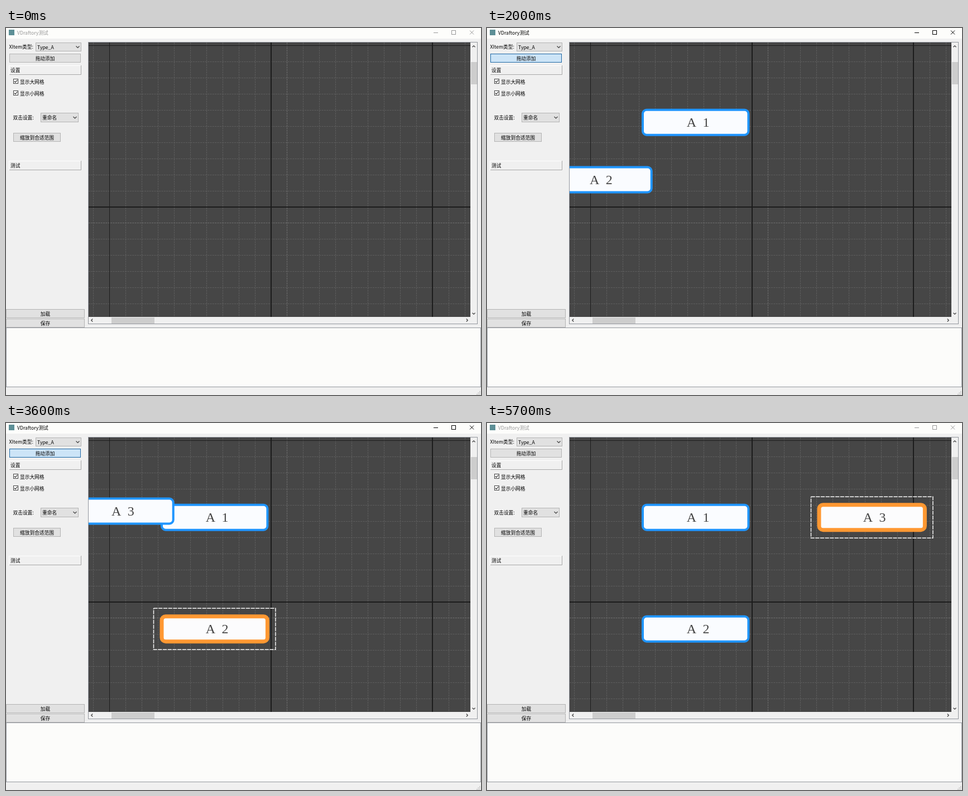
Animation of 851 by 658 pixels, one loop 5.8 s. Source, as an HTML page with a canvas:

```html
<!DOCTYPE html>
<html lang="zh">
<head>
<meta charset="utf-8">
<style>
html, body { margin: 0; width: 100%; height: 100%; overflow: hidden; background: #f0f0f0; }
canvas { display: block; }
</style>
</head>
<body>
<canvas id="stage" width="851" height="658"></canvas>
<script>
const c = document.getElementById('stage').getContext('2d');
const LOOP = 5800, TICK = 100;
const UI_FONT = '8.7px "Noto Sans CJK SC", "Noto Sans CJK", sans-serif';
const ITEM_FONT = '24px "Liberation Serif", serif';
const FRAME = '#93979e', DARK = '#1c1c1c';
// Button looks: idle, hovered, pressed
const FACES = ['#e1e1e1', '#e5f1fb', '#cce4f7'], EDGES = ['#b4b4b4', '#2c8bdb', '#1f68a5'];

const move = (start, end, x, y) => ({ start, end, x, y });
const nodes = [
  { x: 203, y: 104, moves: [move(900, 1400, 373.7, 169.2)] },
  { x: 200, y: 272, moves: [move(2000, 2500, 325, 356), move(2600, 2800, 373.7, 367.7), move(2800, 2900, 373.7, 369.2)],
    selected: [2600, 4400], handles: [2600, 3300], guide: [2800, 3100] },
  { x: 205, y: 158, moves: [move(3600, 4400, 677, 172.5), move(4400, 4500, 689.7, 169.2)],
    selected: [4400, LOOP], handles: [4400, 5100], guide: [4500, 4800] }
];
const presses = [[400, 2600], [3300, 4400]];

const within = (t, span) => span && t >= span[0] && t < span[1];
const clamp = (v, low, high) => Math.max(low, Math.min(high, v));
const easeOut = f => 1 - (1 - f) ** 3;

function place(node, t) {
  let { x, y } = node;
  for (const m of node.moves) {
    const f = easeOut(clamp((t - m.start) / (m.end - m.start), 0, 1));
    x += (m.x - x) * f;
    y += (m.y - y) * f;
  }
  return [x, y];
}

// Fades through hover to pressed, then quickly back
function pressLevel(t) {
  const levels = presses.map(([on, off]) => clamp(Math.min((t - on + 100) / 250, (off + 100 - t) / 100), 0, 2));
  return Math.round(Math.max(...levels));
}

function fill(color, x, y, w, h) {
  c.fillStyle = color;
  c.fillRect(x, y, w, h);
}

function box(x, y, w, h, face, edge) {
  fill(face, x, y, w, h);
  c.strokeStyle = edge;
  c.lineWidth = 1;
  c.strokeRect(x + .5, y + .5, w - 1, h - 1);
}

function line(color, width, ...p) {
  c.strokeStyle = color;
  c.lineWidth = width;
  c.beginPath();
  for (let i = 0; i < p.length; i += 2) c.lineTo(p[i], p[i + 1]);
  c.stroke();
}

// y is the vertical middle of the glyphs
function label(text, x, y, align = 'left', color = '#000') {
  c.font = UI_FONT;
  c.textAlign = align;
  c.fillStyle = color;
  c.fillText(text, x, y + 3.3);
}

function button(text, x, y, w, h, level = 0) {
  box(x, y, w, h, FACES[level], EDGES[level]);
  label(text, x + w / 2, y + h / 2 + .3, 'center');
}

function chevron(x, y, dx, dy, s = 2.5) {
  line('#404040', 1.2, x - dx * s / 2 - dy * s, y - dy * s / 2 - dx * s, x + dx * s / 2, y + dy * s / 2,
    x - dx * s / 2 + dy * s, y - dy * s / 2 + dx * s);
}

function combo(text, x, y, w, h) {
  box(x, y, w, h, FACES[0], EDGES[0]);
  label(text, x + 3, y + h / 2 + .3);
  chevron(x + w - 6.5, y + h / 2, 0, 1, 3);
}

function header(text, y) {
  line('#fff', 1, 5.5, y + 17, 5.5, y + .5, 134, y + .5);
  line('#a8a8a8', 1, 6, y + 16.5, 134.5, y + 16.5, 134.5, y);
  label(text, 8, y + 8.7);
}

function check(text, y) {
  box(13, y, 9, 9, '#fff', '#444');
  line('#222', 1.1, 14.8, y + 4.5, 16.8, y + 6.5, 20.3, y + 2.3);
  label(text, 25, y + 5.2);
}

function titleBar(active) {
  const ink = active ? '#000' : '#999';
  fill('#fdfdfb', 0, 0, 851, 19);
  fill('#5d8f96', 5, 3, 10, 10);
  label('VDraftory测试', 20, 8.3, 'left', ink);
  line(ink, 1, 766, 8.5, 774, 8.5);
  c.strokeRect(798.5, 4.5, 7, 7);
  line(ink, 1, 831, 4.5, 838, 11.5);
  line(ink, 1, 838, 4.5, 831, 11.5);
}

function sidePanel(level) {
  label('XItem类型:', 5.5, 34);
  combo('Type_A', 53, 26, 82, 16);
  button('拖动添加', 6, 46, 128, 16, level);
  header('设置', 67);
  check('显示大网格', 91);
  check('显示小网格', 112);
  label('双击设置:', 12.5, 160.7);
  combo('重命名', 62, 152, 68, 17);
  button('缩放到合适范围', 13, 188, 85, 16);
  header('测试', 238);
  button('加载', 0, 504, 141, 16);
  button('保存', 0, 521, 141, 16);
}

function frame() {
  box(147, 25, 698, 506, '#f0f0f0', FRAME);
  fill('#cdcdcd', 833, 61, 11, 40);
  fill('#cdcdcd', 189, 519, 77, 11);
  chevron(838, 33, 0, -1);
  chevron(838, 512, 0, 1);
  chevron(154, 524, -1, 0);
  chevron(826, 524, 1, 0);
  box(0, 537, 851, 107, '#fcfcfa', FRAME);
  for (let i = 0; i < 3; i++)
    for (let j = 0; j <= i; j++) fill('#bbb', 848 - j * 2.5, 651 + i * 2.5, 1.5, 1.5);
}

function gridLine(n, width, color) {
  const snap = v => width === 2 ? Math.round(v) : Math.floor(v) + .5;
  const x = snap(475 + n * 28.93), y = snap(321 + n * 28.93);
  line(color, width, x, 26, x, 518);
  line(color, width, 148, y, 832, y);
}

function grid() {
  fill('#464646', 148, 26, 684, 492);
  c.setLineDash([2.9, 1.45]);
  for (let n = -12; n < 13; n++) if (n % 10) gridLine(n, 1, n === 1 ? '#707070' : '#5e5e5e');
  c.setLineDash([]);
  for (let n = -10; n <= 10; n += 10) gridLine(n, n < 0 ? 1 : 2, DARK);
}

function dashed(...points) {
  c.setLineDash([7.2, 1.5]);
  line('#f4f4f4', 1.5, ...points);
  c.setLineDash([]);
}

function handle(x, y) {
  fill(DARK, x - 7.7, y - 7.7, 15.4, 15.4);
  fill('#6680ff', x - 6.3, y - 6.3, 12.6, 12.6);
}

function drawNode(node, index, t) {
  if (t < node.moves[0].start) return;
  const [x, y] = place(node, t), selected = within(t, node.selected);
  c.beginPath();
  c.roundRect(x - 94.7, y - 22.5, 189.4, 45, 7);
  c.fillStyle = selected ? '#fcfcfd' : '#fafcff';
  c.fill();
  c.strokeStyle = selected ? '#ff9832' : '#1f95ff';
  c.lineWidth = selected ? 7 : 4;
  c.stroke();
  c.font = ITEM_FONT;
  c.textAlign = 'center';
  c.fillStyle = '#444';
  c.fillText('A', x - 7.3, y + 7.7);
  c.fillText(index + 1, x + 18.7, y + 7.7);
  if (selected) {
    const l = x - 109.2, r = x + 109.2, top = y - 37, bottom = y + 37;
    dashed(l, top, r, top, r, bottom, l, bottom, l, top);
  }
  if (within(t, node.handles))
    for (const side of [-1, 1]) {
      handle(x + side * 94.7, y);
      handle(x, y + side * 22.5);
    }
}

function draw(now) {
  const t = Math.floor(now % LOOP / TICK) * TICK;
  fill('#f0f0f0', 0, 0, 851, 658);
  titleBar(within(t, [400, 5700]));
  sidePanel(pressLevel(t));
  frame();
  c.save();
  c.beginPath();
  c.rect(148, 26, 684, 492);
  c.clip();
  grid();
  nodes.forEach((node, i) => drawNode(node, i, t));
  for (const node of nodes)
    if (within(t, node.guide)) dashed(...place(nodes[0], t), ...place(node, t));
  c.restore();
}

const start = performance.now();
function loop() {
  draw(performance.now() - start);
  requestAnimationFrame(loop);
}
loop();
</script>
</body>
</html>
```
